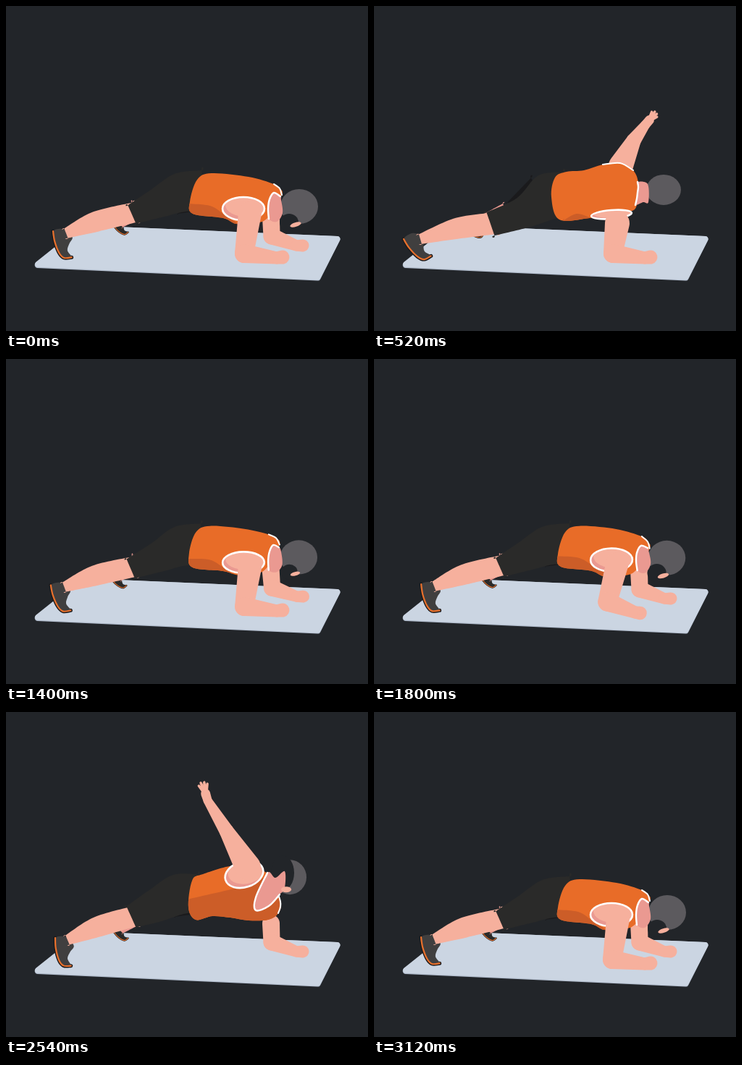
Write an HTML page with a canvas that moves like this. It is 500 px wide and 449 px high and loops after 3380 ms.

```html
<!DOCTYPE html>
<html lang="en">
<head>
<meta charset="utf-8">
<title>Side plank rotation</title>
<style>
html, body { margin: 0; width: 100%; height: 100%; overflow: hidden; background: #222529; }
canvas { display: block; width: 500px; height: 449px; }
</style>
</head>
<body>
<canvas id="stage" width="500" height="449"></canvas>
<script>
const ctx = document.getElementById('stage').getContext('2d');
const LOOP = 3380;
const C = {
  bg: '#222529', mat: '#cbd5e2', edge: '#aeb9c9', skin: '#f6b09d', shade: '#ea9991',
  vest: '#e86c28', fold: '#cc5d28', shorts: '#2a2a29', dark: '#1a1a1c',
  hair: '#5c5a5e', shoe: '#403f3f', white: '#fff', sole: '#e8702c'
};

const poses = (...list) => list.map(s => s.split(/[ ,]+/).map(Number));

// Body parts in three key poses: plank, near-side turn, far-side turn.
// Tubes are x, y, half width along a centre line.
const calf = poses(
  '83,314,7 124,298,14 178,285,14',
  '64,322,7 116,307,14.5 168,300,15',
  '85,315,7 126,297,14 178,282,14');
const shorts = poses(
  '174,288,14 210,272,21 240,258,27 272,256,29',
  '161,301,17 207,285,22 239,264,32 266,260,31',
  '173,283,16 206,268,23 238,252,28 267,250,26');
const farCalf = poses('158,302,5 182,281,13', '145,300,8 182,281,9', '158,302,5 182,281,13');
const farThigh = poses('236,280,7 258,274,10', '188,276,6 226,252,17', '232,276,7 254,270,10');

// Outlines.
const vest = poses(
  '258,287 254,270 264,240 284,231 335,236 370,246 378,252 381,261 362,292 345,300 318,301 300,293',
  '256,295 245,264 250,237 266,229 290,227 316,219 340,217 358,227 365,245 363,275 350,285 298,293',
  '262,287 252,270 257,233 272,224 320,212 366,226 379,262 376,278 362,287 335,288 310,284 285,282');
const fold = poses(
  '250,273 282,276 304,290 322,302',
  '262,296 280,287 300,293 306,296',
  '250,259 302,247 335,238 366,224');
const collar = poses(
  '379,263 370,258 364,267 362,280 363,294',
  '364,243 365,250 364,258 363,266 361,275',
  '361,222 345,256 345,274 363,268 378,252');
const neck = poses(
  '374,298 382,286 380,268', '372,271 379,271 378,246', '385,243 385,220 372,229');

// Ellipses: x, y, radii, tilt.
const head = poses('405,277,26,24,0', '400,254,24,21,0', '392,228,23,24,0');
const face = poses('391,299,13,12,0', '394,262,0,0,0', '382,222,16,24,0');
const ear = poses('400,302,8,3,-.3', '396,262,0,0,0', '387,245,7,4,0');
const armhole = poses('328,280,29,16,0', '328,288,28,6,-.08', '329,224,27,18,-.3');

// Shoe in its own space, sole first; each foot is placed by x, y, degrees.
const [shoe] = poses('0,0 14,3 31,3 40,-1 43,-11 32,-9 24,-15 17,-22 3,-15');
const nearFoot = poses('65,311,69', '41,322,46', '68,312,75');
const farFoot = poses('149,304,38', '130,313,20', '149,304,38');

// Arms: x, y, radius from shoulder to palm, then how far the hand is open.
const nearArm = poses(
  '337,286,16 329,342,13 374,348,8.5 382,347,9.5 0',
  '336,300,17 330,342,13 374,348,8.5 382,347,9.5 0',
  '330,242,15 284,243,13 265,280,7.5 263,287,7 .7',
  '334,214,18 305,164,10 279,121,6 276,111,6.5 1');
const farArm = poses(
  '366,292,12 367,318,11.5 401,331,7.5 410,331,8.5 0',
  '353,257,13 385,263,11 419,240,6.5 428,236,6.5 1',
  '341,221,17 359,186,10 375,165,6.5 381,158,6.5 .85',
  '336,213,16 322,164,10 307,117,6 304,106,6.5 1');

const clamp = v => Math.max(0, Math.min(1, v));
const mix = (a, b, k) => a.map((v, i) => v + (b[i] - v) * k);

// Smooth curve through all key poses.
function through(at, keys, p) {
  const w = at.map((a, i) => at.reduce((m, b, j) => i === j ? m : m * (p - b) / (a - b), 1));
  return keys[0].map((_, i) => w.reduce((s, k, j) => s + k * keys[j][i], 0));
}

function stepwise(at, keys, p) {
  let i = 0;
  while (i < at.length - 2 && p > at[i + 1]) i++;
  return mix(keys[i], keys[i + 1], clamp((p - at[i]) / (at[i + 1] - at[i])));
}

// Spline through points; a doubled point makes a corner.
function trace(v, closed) {
  const n = v.length / 2;
  const pt = i => {
    i = closed ? (i + n) % n : Math.max(0, Math.min(n - 1, i));
    return [v[2 * i], v[2 * i + 1]];
  };
  ctx.beginPath();
  ctx.moveTo(v[0], v[1]);
  for (let i = 0; i < (closed ? n : n - 1); i++) {
    const [a, b, c, d] = [pt(i - 1), pt(i), pt(i + 1), pt(i + 2)];
    ctx.bezierCurveTo(b[0] + (c[0] - a[0]) / 6, b[1] + (c[1] - a[1]) / 6,
      c[0] - (d[0] - b[0]) / 6, c[1] - (d[1] - b[1]) / 6, c[0], c[1]);
  }
  if (closed) ctx.closePath();
}

function fill(v, color) {
  trace(v, true);
  ctx.fillStyle = color;
  ctx.fill();
}

function line(v, color, width) {
  trace(v, false);
  ctx.strokeStyle = color;
  ctx.lineWidth = width;
  ctx.stroke();
}

// Flat-ended limb around a centre line.
function tube(v, color) {
  const n = v.length / 3, left = [], right = [];
  for (let i = 0; i < n; i++) {
    const a = 3 * Math.max(0, i - 1), b = 3 * Math.min(n - 1, i + 1);
    const dir = Math.atan2(v[b + 1] - v[a + 1], v[b] - v[a]);
    const [x, y, r] = v.slice(3 * i);
    const dx = Math.sin(dir) * r, dy = -Math.cos(dir) * r;
    for (let k = i % (n - 1) ? 1 : 2; k--;) {
      left.push(x + dx, y + dy);
      right.unshift(x - dx, y - dy);
    }
  }
  fill(left.concat(right), color);
}

function oval([x, y, rx, ry, tilt], color) {
  ctx.beginPath();
  ctx.ellipse(x, y, Math.max(0, rx), Math.max(0, ry), tilt, 0, 7);
  ctx.fillStyle = color;
  ctx.fill();
}

function clipped(paint) {
  ctx.save();
  ctx.clip();
  paint();
  ctx.restore();
}

function capsule(x, y, r, x2, y2, r2) {
  const d = Math.hypot(x2 - x, y2 - y);
  const a = Math.atan2(y2 - y, x2 - x), b = Math.acos(Math.max(-1, Math.min(1, (r - r2) / d)));
  ctx.beginPath();
  ctx.arc(x, y, r, a + b, a - b + 2 * Math.PI);
  ctx.arc(x2, y2, r2, a - b, a + b);
  ctx.fill();
}

function arm(v) {
  ctx.fillStyle = C.skin;
  for (let i = 0; i < 9; i += 3) capsule(...v.slice(i, i + 6));
  const [wx, wy, , x, y, , open] = v.slice(6), aim = Math.atan2(y - wy, x - wx);
  const reach = 17 * clamp(open);
  if (reach < 1) return;
  for (let i = 0; i < 4; i++) {
    const a = aim + (i - 1.4) * .3, len = reach - Math.abs(i - 1.4) * 2;
    capsule(x, y, 3, x + Math.cos(a) * len, y + Math.sin(a) * len, 1.7);
  }
}

function foot([x, y, deg], size, color) {
  const sole = shoe.slice(0, 10);
  ctx.save();
  ctx.translate(x, y);
  ctx.rotate(deg * Math.PI / 180);
  ctx.scale(size, size);
  line(sole, C.dark, 5);
  fill(shoe, color);
  line(sole, C.sole, 2.2);
  ctx.restore();
}

function mat(dy, color) {
  const corners = [[105, 303], [464, 318.3], [433, 378.5 + dy], [33, 360.3 + dy]];
  ctx.beginPath();
  ctx.moveTo(200, 307);
  corners.forEach((c, i) => {
    const from = corners[(i + 1) % 4], to = corners[(i + 2) % 4];
    ctx.arcTo(...from, ...to, 4);
  });
  ctx.closePath();
  ctx.fillStyle = color;
  ctx.fill();
}

const ease = (t, a, b) => (1 - Math.cos(Math.PI * clamp((t - a) / (b - a)))) / 2;

function draw(t) {
  const first = t < 1640;
  const p = first ? ease(t, 0, 680) - ease(t, 840, 1560) : ease(t, 1720, 2320) - ease(t, 2520, 3120);
  const pose = k => first ? mix(k[0], k[1], p / .87) : mix(k[0], k[2], p);

  ctx.fillStyle = C.bg;
  ctx.fillRect(0, 0, 500, 449);
  mat(1.2, C.edge);
  mat(0, C.mat);

  foot(pose(farFoot), .48, C.shorts);
  tube(pose(farCalf), C.shade);
  tube(pose(farThigh), C.dark);
  foot(pose(nearFoot), 1, C.shoe);
  tube(pose(calf), C.skin);
  tube(pose(shorts), C.shorts);
  arm(first ? stepwise([.1, .62, .87, 1], farArm, p) : farArm[0]);

  oval(pose(head), C.hair);
  oval(pose(face), C.bg);
  const body = pose(vest), edge = pose(collar), bend = pose(fold);
  fill(body, C.vest);
  clipped(() => fill([...bend.slice(0, 2), ...bend, ...bend.slice(-2), 400, 330, 400, 330, 250, 330, 250, 330], C.fold));
  line(body.slice(10, 16), C.white, 2);
  fill(edge.concat(pose(neck)), C.shade);
  line(edge, C.white, 2.4);
  oval(pose(ear), C.skin);

  const hole = pose(armhole);
  oval(hole, C.shade);
  clipped(() => oval([hole[0] + 4, hole[1] - hole[3] * .3, ...hole.slice(2)], C.skin));
  ctx.strokeStyle = C.white;
  ctx.lineWidth = 2.6;
  ctx.beginPath();
  ctx.ellipse(...hole, 0, 7);
  ctx.stroke();
  arm(first ? pose(nearArm) : through([0, .6, 1], [nearArm[0], nearArm[2], nearArm[3]], p));
}

ctx.lineCap = ctx.lineJoin = 'round';
const start = performance.now();
function tick() {
  draw((performance.now() - start) % LOOP);
  requestAnimationFrame(tick);
}
tick();
</script>
</body>
</html>
```
